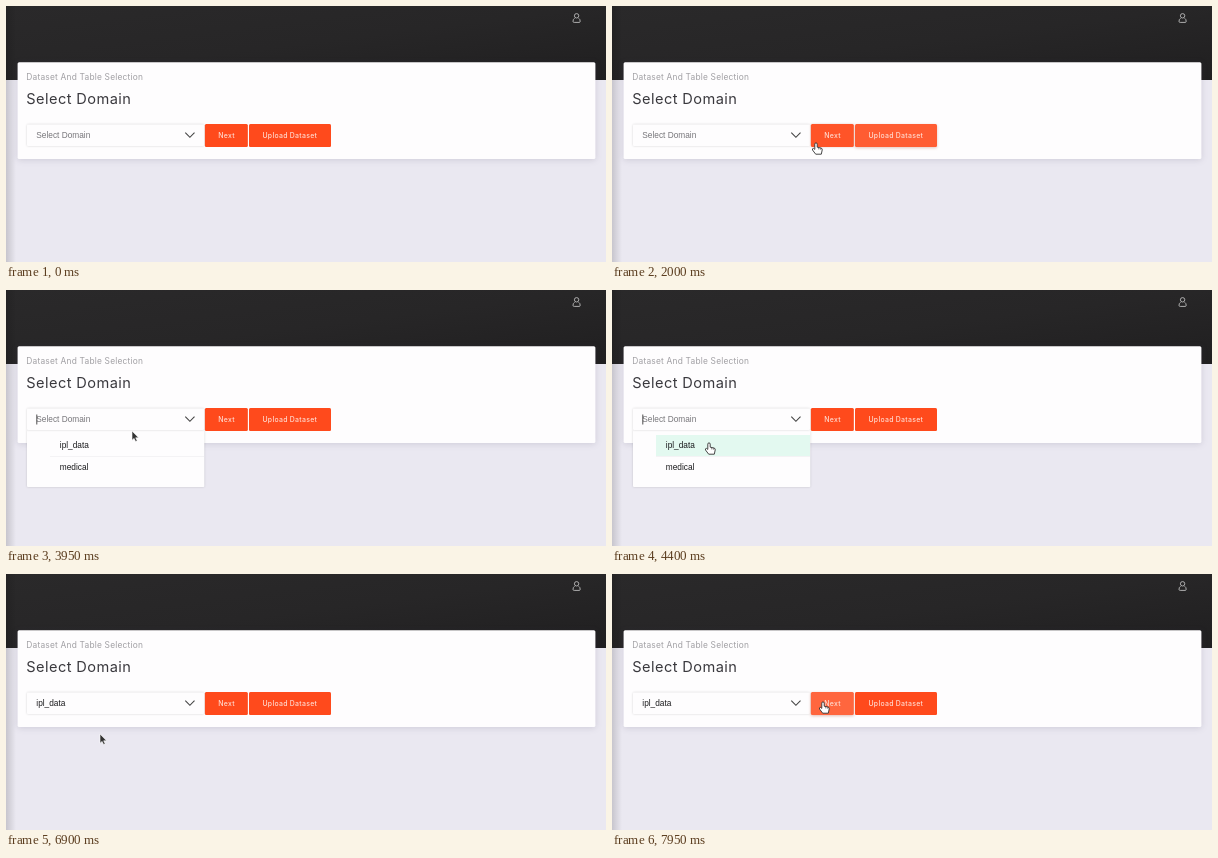
These frames come from a looping animation (600 by 256 pixels, 8000 ms). An HTML page:

```html
<!DOCTYPE html>
<html lang="en">
<head>
<meta charset="utf-8">
<title>Dataset selection</title>
<style>
  html, body { margin: 0; width: 100%; height: 100%; overflow: hidden; background: #eae8f1; }
  svg { display: block; }
  .ui { font-family: Inter, sans-serif; }
  .btn { font: 500 6.9px Inter, sans-serif; letter-spacing: .29px; fill: #ffdcd2; text-anchor: middle; }
  .field { font: 8.3px "Liberation Sans", Arial, sans-serif; fill: #1a1a1c; }
  .card { filter: drop-shadow(0 1px 3px rgba(60, 55, 90, .16)); }
  .low { filter: drop-shadow(0 .7px 1px rgba(0, 0, 0, .16)); }
</style>
</head>
<body>
<svg width="600" height="256" viewBox="0 0 600 256">
  <defs>
    <linearGradient id="dark" x1="0" y1="0" x2="1" y2="1">
      <stop offset="0" stop-color="#2a292a"/>
      <stop offset=".5" stop-color="#272627"/>
      <stop offset="1" stop-color="#201f20"/>
    </linearGradient>
    <linearGradient id="edge">
      <stop offset="0" stop-color="#000" stop-opacity=".15"/>
      <stop offset="1" stop-color="#000" stop-opacity="0"/>
    </linearGradient>
  </defs>
  <rect width="600" height="256" fill="#eae8f1"/>
  <rect width="600" height="74" fill="url(#dark)"/>
  <rect width="10" height="256" fill="url(#edge)"/>
  <g fill="none" stroke="#bdbdbd" stroke-width=".9">
    <circle cx="570.6" cy="9.8" r="2.2"/>
    <path d="M568.6 12.3Q567 13.2 567 15.4Q567 16.4 568.2 16.4H573Q574.2 16.4 574.2 15.4Q574.2 13.2 572.6 12.3"/>
  </g>

  <rect class="card" x="11.6" y="56.2" width="577.8" height="96.8" rx="1.5" fill="#fefdfe"/>
  <text class="ui" x="20.3" y="73.5" font-size="8.4" letter-spacing=".2" fill="#a09fa3">Dataset And Table Selection</text>
  <text class="ui" x="20.3" y="98" font-size="14.6" letter-spacing=".42" fill="#3a393e">Select Domain</text>

  <g id="menu">
    <rect class="low" x="21" y="140" width="177.3" height="57" rx="1" fill="#fefdfe"/>
    <rect id="item" x="44" y="145" width="154" height="21.5" fill="#e3f9f0"/>
    <path d="M44 166.5H198" stroke="#f4f3f5"/>
    <text class="field" x="53.8" y="158.4">ipl_data</text>
    <text class="field" x="53.8" y="180.4">medical</text>
  </g>

  <rect class="low" x="21" y="118.5" width="177" height="21.5" rx="1" fill="#fefdfe"/>
  <rect id="select" x="20.5" y="118.5" width="177.5" height="21.5" rx="1" fill="none" stroke="#2fd9b0"/>
  <text id="value" class="field" x="30.3" y="132.2"></text>
  <path id="caret" d="M30.8 124.5V134.5" stroke="#222" stroke-width=".8"/>
  <path d="M179.3 126.6L183.9 131.3L188.5 126.6" fill="none" stroke="#444" stroke-width="1.1"/>

  <rect id="next" x="198.9" y="118" width="42.9" height="23" rx="1.5"/>
  <text class="btn" x="220.5" y="131.8">Next</text>
  <rect id="upload" x="243" y="118" width="82" height="23" rx="1.5"/>
  <text class="btn" x="283.8" y="131.8">Upload Dataset</text>

  <g id="pointer">
    <path id="arrow" d="M0 0V9.2L2.1 7.4L3.6 10.6L5.2 9.8L3.7 6.8H6.6Z" fill="#333" stroke="#fff" stroke-width=".6"/>
    <g id="hand">
      <path d="M-1.2 1.1A1.2 1.2 0 0 1 1.2 1.1V4.2L5 5Q6.5 5.4 6.2 7L5.3 11.2H-.3L-3.5 7Q-4 5.4-2.4 5.4L-1.2 6.4Z" fill="#fff" stroke="#333" stroke-width=".9" stroke-linejoin="round"/>
      <path d="M2.7 4.8V6.4M4.4 5.2V6.7" stroke="#333" stroke-width=".6"/>
    </g>
  </g>
</svg>
<script>
const LOOP = 8000, STEP = 50, ENTER = 1400, OPEN = 2650, PICK = 6200, BLINK = 600;
const $ = id => document.getElementById(id);
const spots = ["select", "next", "upload", "item"];

// each leg glides to a resting place: start, end, x, y
const legs = [
  [1400, 1800, 300, 134],
  [1800, 2000, 204, 137],
  [2000, 2350, 181, 128],
  [3400, 3650, 284, 142],
  [3650, 3950, 126, 141],
  [3950, 4400, 97, 153],
  [4400, 4700, 94, 160],
  [6900, 7700, 218, 131],
  [7700, 7950, 211, 128]
];

function pointerAt(t) {
  let x = 458, y = 204;
  for (const [from, to, x2, y2] of legs) {
    const k = Math.min(1, Math.max(0, (t - from) / (to - from)));
    x += (x2 - x) * k;
    y += (y2 - y) * k;
  }
  return [x, y];
}

const isOpen = t => t >= OPEN && t < PICK;

function over(id, t) {
  if (t < ENTER || (id === "item" && !isOpen(t))) return false;
  const [x, y] = pointerAt(t);
  const [l, top, w, h] = ["x", "y", "width", "height"].map(k => $(id)[k].baseVal.value);
  return x >= l && x < l + w && y >= top && y < top + h;
}

// hover strength, fading in and out at a fixed rate
function glow(id, t) {
  let v = 0;
  for (let s = ENTER; s < t; s += STEP)
    v = Math.min(1, Math.max(0, v + (over(id, s) ? .34 : -.34)));
  return v;
}

function show(id, on) {
  $(id).style.display = on ? "" : "none";
}

function paintButton(id, t) {
  const v = glow(id, t), el = $(id);
  el.style.fill = `rgb(255,${74 + 28 * v},${28 + 34 * v})`;
  el.style.filter = `drop-shadow(0 ${.3 + 1.2 * v}px ${.7 + v}px rgba(170,70,40,${.25 + .1 * v}))`;
}

function draw(ms) {
  const t = Math.floor(ms % LOOP / STEP) * STEP;
  const picked = t >= PICK, hand = spots.some(id => over(id, t));
  show("menu", isOpen(t));
  show("item", over("item", t));
  show("caret", isOpen(t) && Math.floor((t - OPEN) / BLINK) % 2 === 0);
  $("value").textContent = picked ? "ipl_data" : "Select Domain";
  $("value").style.fill = picked ? "#1a1a1c" : "#77767a";
  $("select").style.opacity = glow("select", t);
  paintButton("next", t);
  paintButton("upload", t);
  show("pointer", t >= ENTER);
  show("hand", hand);
  show("arrow", !hand);
  $("pointer").setAttribute("transform", `translate(${pointerAt(t)})`);
}

const start = performance.now();
function tick() {
  draw(performance.now() - start);
  requestAnimationFrame(tick);
}
tick();
</script>
</body>
</html>
```
